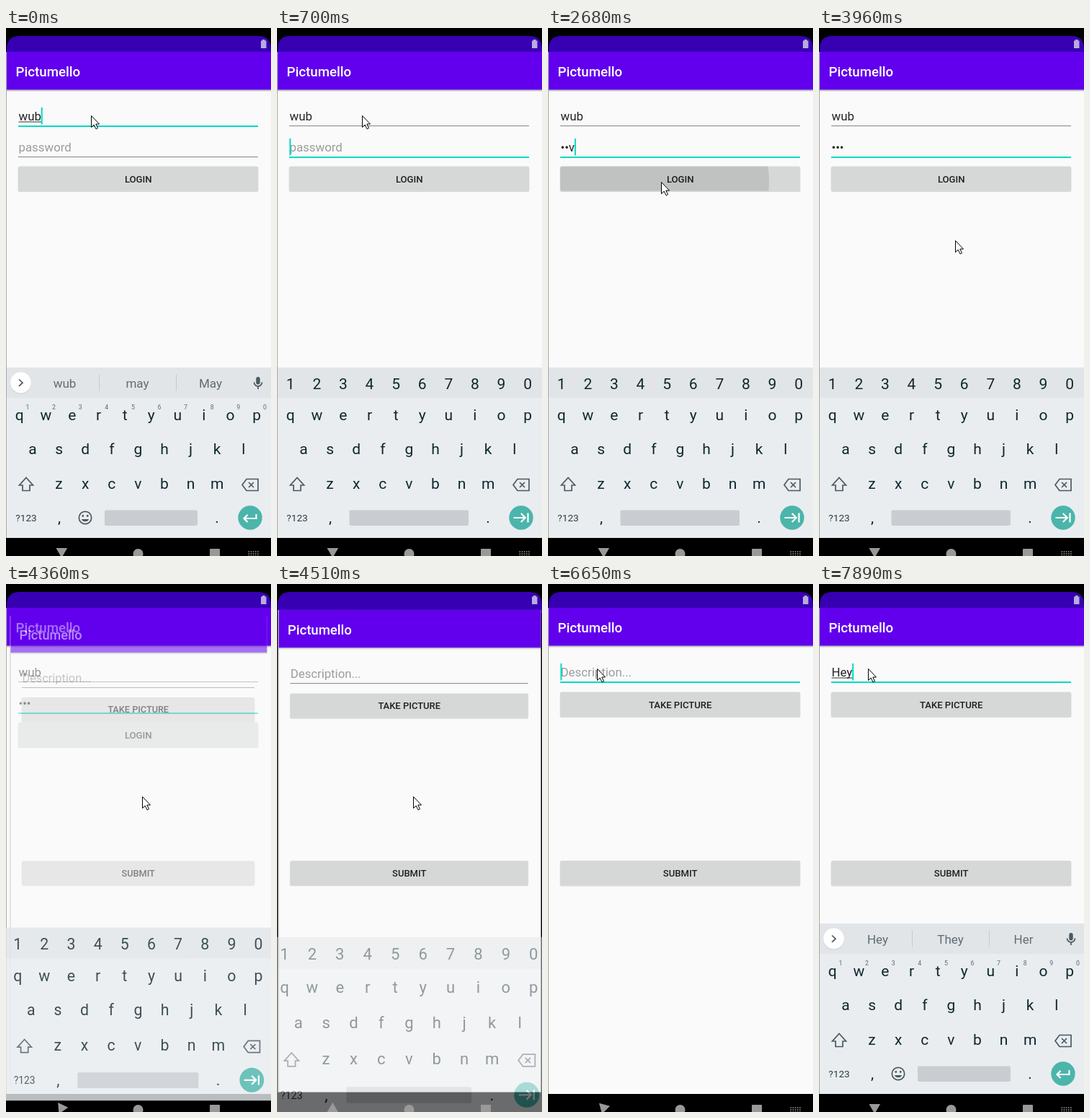
Recreate the animation shown at these times as an HTML page. Size 368 px wide and 731 px high, loop 8000 ms.

```html
<!DOCTYPE html>
<html lang="en">
<head>
<meta charset="utf-8">
<title>Login and post</title>
<style>
  html, body { margin: 0; width: 100%; height: 100%; overflow: hidden; background: #000; }
  svg { display: block; width: 368px; height: 731px; font-family: Roboto, sans-serif; }
  .title { font-size: 18.7px; font-weight: 500; fill: #fff; }
  .input { font-size: 16.85px; fill: #242424; }
  .hint { fill: #9c9c9c; }
  .label { font-size: 13.1px; font-weight: 500; fill: #202020; text-anchor: middle; }
  .key { font-size: 21px; fill: #10272f; text-anchor: middle; }
  .small { font-size: 8.8px; fill: #5d6a70; text-anchor: middle; }
  .sym { font-size: 13.6px; fill: #2a3b42; text-anchor: middle; }
  .word { font-size: 17px; fill: #606c73; text-anchor: middle; }
  .line { fill: none; stroke: #4b5960; stroke-width: 1.7; }
  .white { fill: none; stroke: #fff; stroke-width: 2.2; }
</style>
</head>
<body>
<svg viewBox="0 0 368 731">
  <defs>
    <linearGradient id="shade" x2="0" y2="1">
      <stop stop-color="#000" stop-opacity=".3"/>
      <stop offset="1" stop-color="#000" stop-opacity="0"/>
    </linearGradient>
    <clipPath id="loginClip"><rect x="17" y="191.5" width="333" height="34" rx="2"/></clipPath>
  </defs>

  <rect width="368" height="731"/>
  <path d="M1 40V29Q1 11 19 11H350Q368 11 368 29V40Z" fill="#3700b3"/>
  <rect x="12" y="20" width="2" height="2" fill="#2a0a86"/>
  <path d="M354 17.5h2V16h3.500v1.500h2V28H354Z" fill="#b9abe0"/>

  <g id="login"></g>
  <g id="post"></g>

  <g id="keyboard">
    <rect x="1" y="470" width="367" height="236" fill="#e9edf0"/>
    <rect x="1" y="470" width="367" height="42" fill="#e1e5e8"/>
    <g id="keys"></g>
    <text class="sym" x="28" y="683">?123</text>
    <text class="key" x="74" y="685" font-size="18">,</text>
    <text class="key" x="293" y="685" font-size="18">.</text>
    <path class="line" d="M28 622.500L37.500 633H33V640.500H23V633H18.500Z"/>
    <path class="line" d="M328 632.500L334 624.500H350V640.500H334ZM337 629l7 7M344 629l-7 7"/>
    <circle cx="339" cy="678" r="16.7" fill="#4bb5ab"/>

    <g id="wordMode">
      <circle cx="20.500" cy="492" r="14.600" fill="#000" opacity=".1"/>
      <circle cx="20.500" cy="491" r="14.400" fill="#fff"/>
      <path class="line" d="M18 486.500l5 4.700l-5 4.700"/>
      <path d="M129.500 480V502.500M236.500 480V502.500" stroke="#c5cacd"/>
      <g id="words"></g>
      <rect x="347.300" y="483" width="5.400" height="10.500" rx="2.700" fill="#4b5960"/>
      <path class="line" d="M344.500 490.500a5.500 5.500 0 0 0 11 0M350 496v4"/>
      <g id="hints"></g>
      <circle class="line" cx="110" cy="678" r="8.700"/>
      <circle cx="106.800" cy="675.500" r="1.400" fill="#4b5960"/>
      <circle cx="113.200" cy="675.500" r="1.400" fill="#4b5960"/>
      <path d="M105 680h10a5.200 4.500 0 0 1-10 0Z" fill="#4b5960"/>
      <rect x="137" y="667.500" width="129" height="21.500" rx="2" fill="#c9cdd1"/>
      <path class="white" d="M347.500 673V679H331M335.500 674L330.500 679L335.500 684"/>
    </g>
    <g id="numberMode">
      <g id="digits"></g>
      <rect x="100.500" y="667.500" width="165.500" height="21.500" rx="2" fill="#c9cdd1"/>
      <path class="white" d="M328.500 678H344M338.800 672L344.800 678L338.800 684M348.500 671.500V684.500"/>
    </g>
  </g>

  <g fill="#999">
    <path id="back" d="M0 9L-7.800 -4.500H7.800Z"/>
    <circle cx="183.500" cy="728" r="7"/>
    <rect x="283" y="721" width="14" height="14" rx="1"/>
    <path id="imeIcon" d="M336.500 725H351M336.500 728H351M336.500 731H351" stroke="#999" stroke-width="1.600" stroke-dasharray="1.600 1.550"/>
  </g>

  <path id="pointer" d="M.5 .5V16.500L4.200 13L7 18.800L9.500 17.600L6.800 12H11.500Z" fill="#fff" stroke="#000"/>
</svg>
<script>
const LOOP = 8000, TEAL = '#03dac5';
const $ = id => document.getElementById(id);

function add(parent, tag, attrs, text) {
  const el = document.createElementNS('http://www.w3.org/2000/svg', tag);
  for (const k in attrs) el.setAttribute(k, attrs[k]);
  if (text) el.textContent = text;
  return parent.appendChild(el);
}
const set = (el, attrs) => { for (const k in attrs) el.setAttribute(k, attrs[k]); };
const show = (el, on) => set(el, { visibility: on ? 'visible' : 'hidden' });

function screen(g) {
  add(g, 'rect', { x: 0, y: 33, width: 368, height: 673, fill: '#fafafa' });
  add(g, 'rect', { x: 0, y: 33, width: 1, height: 673, fill: '#a8a8a8' });
  add(g, 'rect', { x: 1, y: 33, width: 367, height: 52.5, fill: '#6200ee' });
  add(g, 'rect', { x: 1, y: 85.5, width: 367, height: 3, fill: 'url(#shade)' });
  add(g, 'text', { class: 'title', x: 13.5, y: 67 }, 'Pictumello');
}

function button(g, y, label) {
  add(g, 'rect', { x: 16.5, y: y + .5, width: 334, height: 35, rx: 2.5, fill: '#000', opacity: .13 });
  add(g, 'rect', { x: 17, y, width: 333, height: 34, rx: 2, fill: '#d6d8d7' });
  add(g, 'text', { class: 'label', x: 183.7, y: y + 22 }, label);
}

function field(g, y, hint) {
  const text = add(g, 'text', { x: 17.5, y });
  const under = add(g, 'rect', { x: 17.5, y: y + 1.5, height: 1, fill: '#333' });
  const line = add(g, 'rect', { x: 17, width: 333 });
  const caret = add(g, 'rect', { y: y - 18, width: 2, height: 23.5, fill: TEAL });
  return (value, focus, blink, composing) => {
    text.textContent = value || hint;
    set(text, { class: value ? 'input' : 'input hint' });
    const w = value ? text.getComputedTextLength() : 0;
    set(under, { width: composing ? w : 0 });
    set(line, focus ? { y: y + 7, height: 2, fill: TEAL } : { y: y + 7, height: 1, fill: '#858585' });
    set(caret, { x: 17.3 + w });
    show(caret, focus && blink);
  };
}

function row(g, chars, x, y, cls = 'key') {
  [...chars].forEach((c, i) => add(g, 'text', { class: cls, x: x + 36.6 * i, y }, c));
}

const login = $('login'), post = $('post');
screen(login);
const userField = field(login, 128, 'username');
const passField = field(login, 171, 'password');
button(login, 191.5, 'LOGIN');
const ripple = add(add(login, 'g', { 'clip-path': 'url(#loginClip)' }), 'circle', { cx: 157, cy: 213 });

screen(post);
const descField = field(post, 128, 'Description...');
button(post, 149.5, 'TAKE PICTURE');
button(post, 383, 'SUBMIT');

row($('keys'), 'qwertyuiop', 18.7, 543);
row($('keys'), 'asdfghjkl', 37, 590);
row($('keys'), 'zxcvbnm', 73.5, 638);
row($('digits'), '1234567890', 18.7, 500);
row($('hints'), '1234567890', 30, 528, 'small');
const words = [81.5, 182.5, 284].map(x => add($('words'), 'text', { class: 'word', x, y: 498 }));

// Each track is a list of [start time, value...]; values hold until the next entry.
const tracks = {
  pointer: [[0, 118, 121], [1900, 126, 136], [2030, 139, 175], [2160, 151, 204], [2290, 157, 213],
    [3410, 161, 229], [3540, 178, 270], [3680, 189, 294],
    [5590, 98, 186], [5740, 84, 155], [5870, 73, 128], [6000, 68, 117]],
  password: [[0, ''], [1200, 'w'], [1350, '•u'], [1470, '••v'], [2690, '•••']],
  blink: [[0, 1], [770, 0], [1200, 1], [1900, 0], [2420, 1], [2830, 0], [3410, 1], [3960, 0], [6400, 1]],
  ripple: [[0, 0, 0], [2420, 70, .08], [2550, 150, .1], [2690, 200, .06], [2830, 0, 0]],
  post: [[0, 0, .96], [4360, .55, .97], [4510, 1, .992], [4630, 1, .998], [4780, 1, 1]],
  keyboard: [[0, 1, 0], [4360, .8, .3], [4510, .45, 1], [4630, .15, 1.4], [4780, 0, 1.5],
    [6800, .6, .6], [6950, 1, 0]],
  back: [[0, 0], [4360, 25], [4510, 60], [4630, 80], [4780, 90], [6650, 15], [6800, 4], [6950, 0]],
  desc: [[0, ''], [7380, 'H'], [7550, 'He'], [7720, 'Hey']],
  words: [[0, 'wub', 'may', 'May'], [400, '', '', ''], [7720, 'Hey', 'They', 'Her']]
};
const at = (name, t) => tracks[name].filter(e => e[0] <= t).pop().slice(1);

function draw(t) {
  const [blink] = at('blink', t), inUser = t < 270, numbers = t >= 400 && t < 4780;

  userField('wub', inUser, true, inUser);
  passField(at('password', t)[0], !inUser, blink, false);
  const [desc] = at('desc', t);
  descField(desc, t >= 6270, blink, true);

  const [r, dim] = at('ripple', t);
  set(ripple, { r, opacity: dim });

  const [alpha, zoom] = at('post', t);
  show(login, alpha < 1);
  set(post, { opacity: alpha, transform: `translate(184 400) scale(${zoom}) translate(-184 -400)` });

  const [solid, z] = at('keyboard', t);
  set($('keyboard'), {
    opacity: solid,
    transform: `translate(183.5 ${492 + 20 * z}) scale(${1 + .05 * z}) translate(-183.5 -492)`
  });
  $('wordMode').style.display = numbers ? 'none' : '';
  $('numberMode').style.display = numbers ? '' : 'none';
  at('words', t).forEach((w, i) => { words[i].textContent = w; });

  const [turn] = at('back', t);
  set($('back'), { transform: `translate(77.3 ${724.5 + 3.5 * turn / 90}) rotate(${turn})` });
  show($('imeIcon'), t < 4360 || t >= 6650);

  set($('pointer'), { transform: `translate(${at('pointer', t).join(' ')})` });
}

const start = performance.now();
function tick() {
  draw((performance.now() - start) % LOOP);
  requestAnimationFrame(tick);
}
tick();
</script>
</body>
</html>
```
